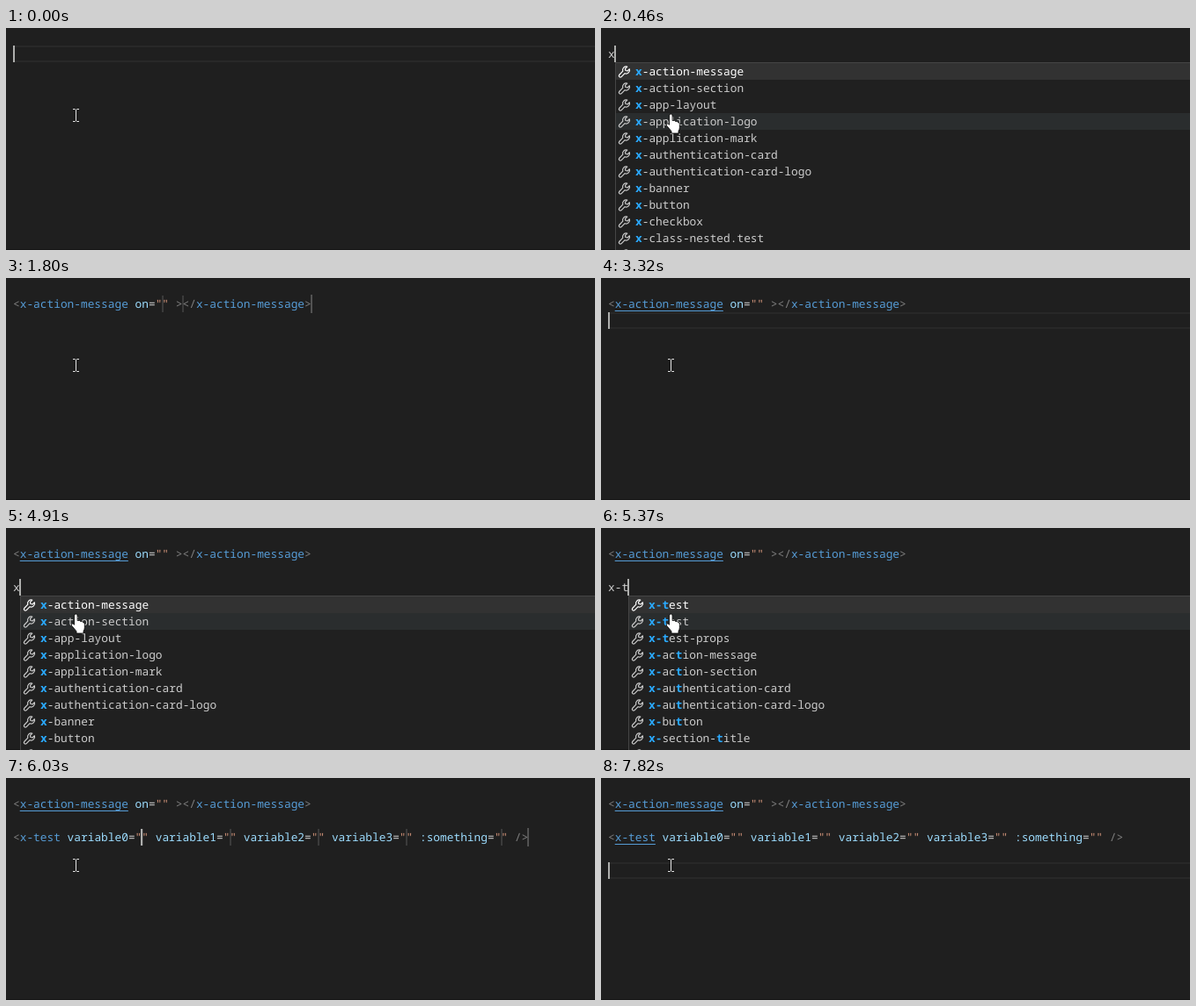
These frames come from a looping animation (669x253 px, 8 s). An HTML page:

```html
<!DOCTYPE html>
<html lang="en">
<head>
<meta charset="utf-8">
<title>Component completion</title>
<style>
  html, body { margin: 0; width: 100%; height: 100%; overflow: hidden; background: #1f1f1f; }
  svg { display: block; width: 669px; height: 253px; }
  text {
    font: 12.83px "Noto Sans Mono", "DejaVu Sans Mono", monospace;
    white-space: pre;
    text-rendering: geometricPrecision;
  }
  .match { font-weight: 700; fill: #2aaaff; }
</style>
</head>
<body>
<svg id="stage" viewBox="0 0 669 253"></svg>
<script>
const LOOP = 8000, LEFT = 8, TOP = 20, LINE = 19, CHAR = 7.698;
const WRENCH = 'M10.3 1.1A4 4 0 0 0 5.3 6.2L1.2 10.5A1.65 1.65 0 0 0 3.5 12.8L7.6 8.7A4 4 0 0 0 12.9 3.8L10.6 6 8.5 5.5 8 3.4Z';
const HAND = 'M77.5 100q0-2 1.8-2t1.8 2v5.5q3-.6 3.4.9 2.2-.5 2.8 1 2-.1 2 2.2v4q0 2-1.3 3.9v2.5h-8v-2.3l-5.3-6.3q-1-1.8.6-2.3 1-.2 2.2 1.2z';
const BEAM = 'M76 92.5h2.5l1 1 1-1H83M79.5 93v13M76 106.5h2.5l1-1 1 1H83';

const message = '<x-action-message on="" ></x-action-message>';
const test = '<x-test variable0="" variable1="" variable2="" variable3="" :something="" />';
const menu = {
  all: ['action-message', 'action-section', 'app-layout', 'application-logo', 'application-mark',
    'authentication-card', 'authentication-card-logo', 'banner', 'button', 'checkbox',
    'class-nested.test', 'confirmation-modal'],
  t: ['test', 'test', 'test-props', 'action-message', 'action-section', 'authentication-card',
    'authentication-card-logo', 'button', 'section-title', 'class-nested.test'],
  te: ['test', 'test', 'test-props', 'class-nested.test', 'action-message', 'action-section',
    'authentication-card', 'authentication-card-logo', 'section-title', 'validation-errors'],
  tes: ['test', 'test', 'test-props', 'class-nested.test', 'nested.test', 'action-message',
    'validation-errors']
};

// Each step changes part of the editor state.
const steps = [
  [0, { lines: [''], row: 0, col: 0, caret: true, list: null, stops: [], links: [] }],
  [130, { caret: false }],
  [260, { lines: ['x'], col: 1, caret: true }],
  [460, { list: menu.all }],
  [660, { lines: ['x-'], col: 2 }],
  [1140, { caret: false }],
  [1270, { lines: [message], col: 22, caret: true, list: null, stops: [22, 25, 44] }],
  [1800, { caret: false }],
  [2260, { caret: true, links: [16] }],
  [2460, { col: 25 }],
  [2860, { col: 44, stops: [] }],
  [3320, { lines: [message, ''], row: 1, col: 0 }],
  [3780, { lines: [message, '', ''], row: 2 }],
  [4240, { caret: false }],
  [4720, { lines: [message, '', 'x'], col: 1, caret: true }],
  [4910, { list: menu.all }],
  [5040, { lines: [message, '', 'x-'], col: 2 }],
  [5370, { lines: [message, '', 'x-t'], col: 3, list: menu.t }],
  [5500, { lines: [message, '', 'x-te'], col: 4, list: menu.te }],
  [5630, { lines: [message, '', 'x-tes'], col: 5, list: menu.tes }],
  [6030, { lines: [message, '', test], col: 19, list: null, stops: [19, 32, 45, 58, 72, 76] }],
  [6570, { caret: false }],
  [7030, { caret: true, links: [16, 0, 6] }],
  [7360, { lines: [message, '', test, ''], row: 3, col: 0, stops: [] }],
  [7820, { lines: [message, '', test, '', ''], row: 4 }]
];

const xAt = col => LEFT + CHAR * col;
const yAt = row => TOP + LINE * row;
const rect = (x, y, w, h, fill) => `<rect x="${x}" y="${y}" width="${w}" height="${h}" fill="${fill}"/>`;
const text = (x, y, body, fill = '#ccc') => `<text x="${x}" y="${y}" fill="${fill}">${body}</text>`;
const escapeHtml = s => s.replace(/</g, '&lt;').replace(/>/g, '&gt;');

function tokenColor(token) {
  if (/[<>]/.test(token)) return '#808080';
  if (token[0] === '"') return '#ce9178';
  if (token.startsWith('x-')) return '#569cd6';
  return token === '=' ? '#d4d4d4' : '#9cdcfe';
}

function codeLine(line, row) {
  if (!line) return '';
  const body = line[0] !== '<' ? line : line.match(/<\/?|\/?>|"+|[\w:.-]+|=|\s+/g)
    .map(t => `<tspan fill="${tokenColor(t)}">${escapeHtml(t)}</tspan>`).join('');
  return text(LEFT, yAt(row) + 14, body);
}

// Bold the prefix, then the rest as a word start, a substring or scattered letters.
function markMatches(word, query) {
  const hits = new Set([...query.slice(0, 2)].keys());
  const rest = query.slice(2);
  let at = word.indexOf('-' + rest) + 1 || word.indexOf(rest, 2);
  if (at < 0) at = 2;
  for (const c of rest) {
    at = word.indexOf(c, at);
    if (at < 0) break;
    hits.add(at++);
  }
  return [...word].map((c, i) => hits.has(i) ? `<tspan class="match">${c}</tspan>` : c).join('');
}

function suggestions(s) {
  const query = s.lines[s.row], top = yAt(s.row + 1), x = Math.round(xAt(s.col));
  const height = s.list.length * LINE + 2;
  let out = `<rect x="${x + .5}" y="${top + .5}" width="700" height="${height}" fill="#202020" stroke="#454545"/>`;
  const hover = Math.floor((99 - top - 1) / LINE);
  s.list.forEach((name, i) => {
    const y = top + 1 + i * LINE, color = i ? '#ccc' : '#fff';
    if (i === 0 || i === hover) out += rect(x + 1, y, 700, LINE, i ? '#2a2d2e' : '#323232');
    out += `<path d="${WRENCH}" transform="translate(${x + 3.5} ${y + 3})" fill="none" stroke="${color}" stroke-width="1.2" stroke-linejoin="round"/>`;
    out += text(x + 23, y + 14, markMatches('x-' + name, query), color);
  });
  return out;
}

function placeholders(s) {
  return s.stops.map((col, i) => {
    const x = Math.round(xAt(col)), y = yAt(s.row);
    return i < s.stops.length - 1
      ? rect(x, y, 2, LINE, '#7c7c7c4d')
      : rect(x - 1, y - 1, 2, LINE + 2, '#525252');
  }).join('');
}

function draw(s) {
  const y = yAt(s.row);
  let out = rect(0, 0, 669, 253, '#1f1f1f') + rect(0, 252, 669, 1, '#161616');
  if (!s.lines[s.row]) {
    out += rect(LEFT, y, 661, 2, '#282828') + rect(LEFT, y + LINE - 2, 661, 2, '#282828');
  }
  out += placeholders(s) + s.lines.map(codeLine).join('');
  s.links.forEach((length, row) => {
    if (length) out += rect(xAt(1), yAt(row) + 17, CHAR * length, 1, '#569cd6');
  });
  if (s.caret) out += rect(s.col ? Math.round(xAt(s.col) - 1) : LEFT, y, 2, LINE, '#aeafad');
  if (s.list) out += suggestions(s);
  out += s.list
    ? `<path d="${HAND}" fill="#fff" stroke="#000" stroke-width=".8"/>`
    : `<path d="${BEAM}" fill="none" stroke="#e4e4e4"/>`;
  return out;
}

const stage = document.getElementById('stage');
let state = {};
const scenes = steps.map(([time, change]) => {
  state = { ...state, ...change };
  return { time, markup: draw(state) };
});

let shown;
function render(time) {
  const scene = scenes.findLast(s => s.time <= time);
  if (scene !== shown) stage.innerHTML = scene.markup;
  shown = scene;
}

const start = performance.now();
function tick() {
  render((performance.now() - start) % LOOP);
  requestAnimationFrame(tick);
}
tick();
</script>
</body>
</html>
```
